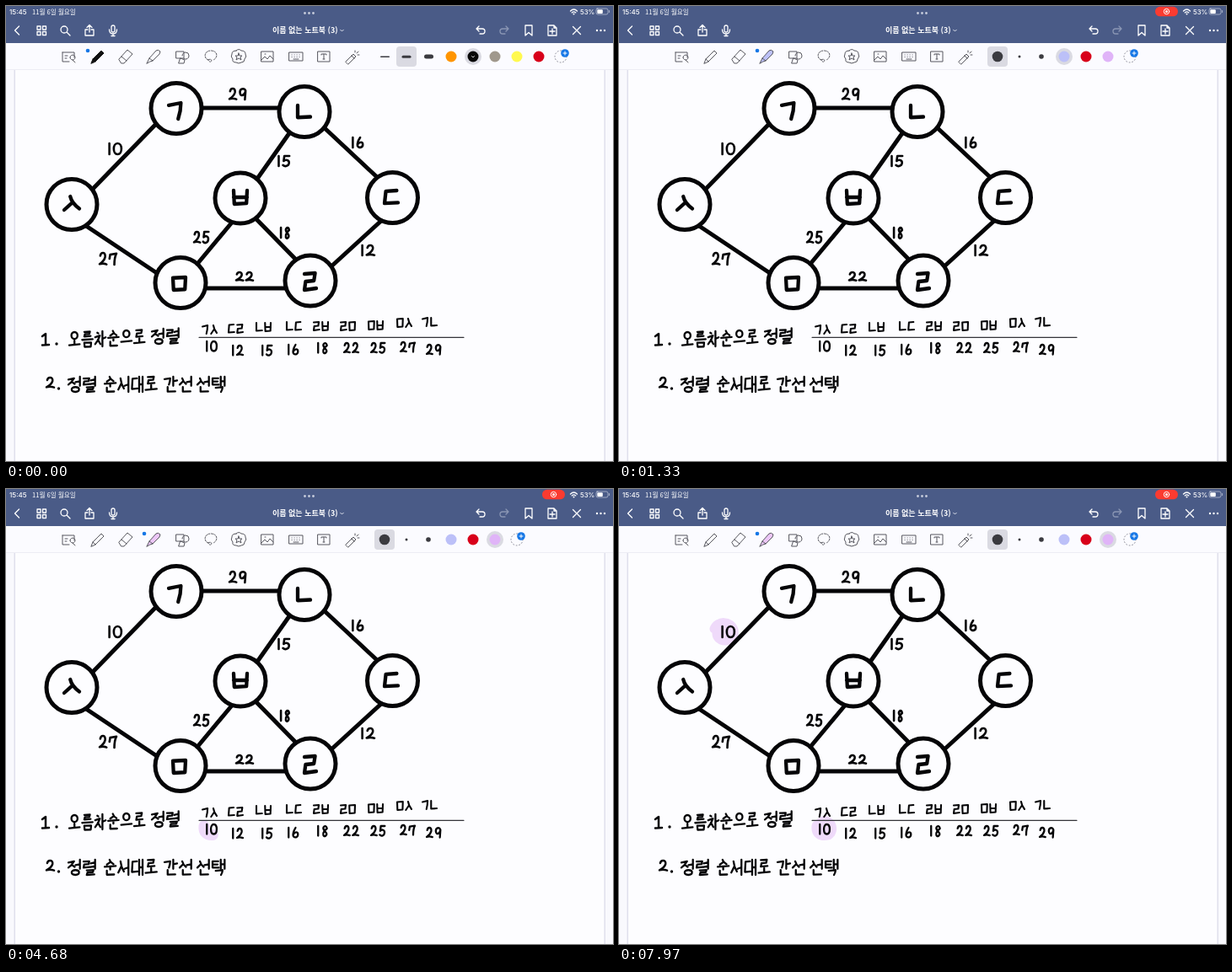
These frames come from a looping animation (720 by 540 pixels, 8 s). An HTML page:

```html
<!DOCTYPE html>
<html lang="ko">
<head>
<meta charset="utf-8">
<title>Minimum spanning tree notes</title>
<style>
  html, body { margin: 0; height: 100%; overflow: hidden; background: #fdfdff; }
  svg { display: block; width: 100vw; height: 100vh; }
  path, line, circle, rect { stroke-linecap: round; stroke-linejoin: round; }
  text { fill: #fff; font-family: Inter, 'Noto Sans CJK KR', 'Noto Sans CJK', sans-serif; }
  .ko { font-family: 'Noto Sans CJK KR', 'Noto Sans CJK', sans-serif; }
</style>
</head>
<body>
<svg id="stage" viewBox="0 0 720 540"></svg>
<script>
const LOOP = 8000;
const INK = '#050507', HEADER = '#4a5b87', SELECTED = '#dadae2', LINE = '#57575e', CHARCOAL = '#3b3b40';
const LAVENDER = '#bcc0f8', PINK = '#e0b4f8', RED = '#d8001a', MARKER = '#efdafa', BLUE = '#1677e6';

const stage = document.getElementById('stage');

function add(tag, attrs, parent = stage) {
  const el = document.createElementNS('http://www.w3.org/2000/svg', tag);
  for (const key in attrs) el.setAttribute(key, attrs[key]);
  return parent.appendChild(el);
}
const group = () => add('g', {});
const rect = (x, y, width, height, fill, rx = 0, parent) =>
  add('rect', { x, y, width, height, fill, rx }, parent);
const dot = (cx, cy, r, fill, parent) => add('circle', { cx, cy, r, fill }, parent);
const label = (x, y, size, content, weight = 500, cls = '') =>
  add('text', { x, y, 'font-size': size, 'font-weight': weight, class: cls }).textContent = content;
const icon = (x, y, d, stroke = LINE, width = 1, fill = 'none', parent) =>
  add('path', { d, transform: `translate(${x} ${y})`, stroke, 'stroke-width': width, fill }, parent);

// Page and bars
rect(0, 0, 720, 540, '#fdfdff');
rect(0, 76, 10, 464, '#f9f9fd');
rect(711, 76, 9, 464, '#f9f9fd');
rect(9.5, 76, 1.5, 464, '#e0e0ec');
rect(709.5, 76, 1.5, 464, '#e0e0ec');
rect(0, 0, 720, 44, HEADER);
rect(0, 44, 720, 31.5, '#fbfbff');
rect(0, 75, 720, 1, '#ececf4');

// Status bar
label(4, 9.6, 8, '15:45');
label(31, 9.6, 7.6, '11월 6일 월요일', 500, 'ko');
for (const x of [354.5, 359.5, 364.5]) dot(x, 8.5, 1.4, '#c5cbdb');
icon(673.5, 7, 'M-4-1Q0-5 4-1M-2.3 .9Q0-1.2 2.3 .9', '#fff', 1.3);
dot(673.5, 9.4, 1, '#fff');
label(681, 9.8, 7.8, '53%');
icon(707, 6.5, 'M-6-3.5H5Q7-3.5 7-1.5V1.5Q7 3.5 5 3.5H-5Q-7 3.5-7 1.5V-1.5Q-7-3.5-5-3.5Z', '#aab3ca', .9);
rect(701.3, 4.3, 6.5, 4.6, '#fff', 1);
icon(715.6, 6.5, 'M0-1V1', '#aab3ca', 1);

// Title bar
label(316, 32.3, 9, '이름 없는 노트북 (3)', 700, 'ko');
icon(398.5, 29, 'M-1.8-.8L0 1L1.8-.8', '#dfe3ee');
[
  [13, 'M2.5-5L-2.5 0L2.5 5'],
  [42, 'M-5-5H-1V-1H-5ZM1.5-5H5.5V-1H1.5ZM-5 1.5H-1V5.5H-5ZM1.5 1.5H5.5V5.5H1.5Z'],
  [70, 'M3-1A4 4 0 1 1-5-1A4 4 0 1 1 3-1M2 2L6 6'],
  [99, 'M-2-1H-5V6H5V-1H2M0 2V-6M-3-3.5L0-6.5L3-3.5'],
  [127, 'M-2-4Q-2-6 0-6T2-4V0Q2 2 0 2T-2 0ZM-4.5-1Q-4.5 4 0 4T4.5-1M0 4V6.5M-2 6.5H2'],
  [563, 'M-2-5L-5-2L-2 1M-5-2H2A3 3 0 0 1 2 4H-1'],
  [591, 'M2-5L5-2L2 1M5-2H-2A3 3 0 0 0-2 4H1', '#8a96b4'],
  [620, 'M-4-6H4V6L0 2.5L-4 6Z'],
  [648, 'M-5-6H2L5-3V6H-5ZM2-6V-3H5M0-2V4M-3 1H3'],
  [677, 'M-4.5-4.5L4.5 4.5M4.5-4.5L-4.5 4.5']
].forEach(([x, d, color = '#fff']) => icon(x, 29, d, color, 1.3));
for (const x of [701, 705.5, 710]) dot(x, 29, 1.2, '#fff');

// Toolbar
const PEN = 'M-7 8L-5 3L5-7L8-4L-2 6ZM-5 3L-2 6';
const HIGHLIGHTER = 'M-8 8L-5 2L3-7Q5-9 8-6L7-3L-1 5L-4 6ZM-5 2L-1 5';
[
  [74, 'M-7-5H7V1M-7-5V6H1M-4-1H-1M2 1A3 3 0 1 1 2 1.1M5 4L8 7M-4 2H-2'],
  [142, 'M-8 3L2-8L8-3L-2 8H-5ZM-5 0L1 5'],
  [209, 'M-7-6H2V2H-7ZM0-1A4 4 0 0 1 8-1A4 4 0 0 1 2 2.6M-2 2L3 4L2 8H-4Z'],
  [243, 'M-3 4C-9 2-8-7 0-7S9 1 3 4M-3 4Q0 2 1 5Q-1 8-3 4', '2 1.4'],
  [276, 'M-3-7Q0-10 3-7Q8-7 8-3Q10 0 7 3Q7 7 3 7Q0 9-3 7Q-8 7-7 3Q-10 0-8-3Q-8-7-3-7ZM0-4L1-1H4L2 1L3 4L0 2L-3 4L-2 1L-4-1H-1Z'],
  [310, 'M-7-6H7V6H-7ZM-7 4L-3 0L0 3L3-1L7 3M-3-3H-2'],
  [344, 'M-8-5H8V5H-8ZM-5-2H-4.8M-2-2H-1.8M1-2H1.2M4-2H4.2M-5 .5H-4.8M-2 .5H-1.8M1 .5H1.2M4 .5H4.2M-3 3H3'],
  [377, 'M-7-6H7V6H-7ZM-3-2V-3H3V-2M0-3V3M-1 3H1'],
  [411, 'M-8 6L1-3L4 0L-5 9ZM-1-1L2 2M3-5V-7M6-2H8M5-4L7-6']
].forEach(([x, d, dash = 'none']) => icon(x, 60, d).setAttribute('stroke-dasharray', dash));

function addColorButton(x, parent) {
  add('circle', { cx: x, cy: 60, r: 7, fill: 'none', stroke: '#8a8a96', 'stroke-dasharray': '1 2.6' }, parent);
  dot(x + 5, 56, 4.8, BLUE, parent);
  icon(x + 5, 56, 'M-2 0H2M0-2V2', '#fff', 1, 'none', parent);
}
function swatches(colors, selected, parent) {
  colors.forEach((color, i) => {
    const x = 528 + 26 * i;
    if (i === selected) dot(x, 60, 10, SELECTED, parent);
    dot(x, 60, 6.5, color, parent);
  });
  addColorButton(528 + 26 * colors.length, parent);
}

const penBar = group();
icon(108, 60, PEN, '#111', 1, '#111', penBar);
icon(175, 60, HIGHLIGHTER, LINE, 1, 'none', penBar);
dot(97, 53, 2.3, BLUE, penBar);
rect(463, 48, 24, 24, SELECTED, 4, penBar);
rect(444, 59.4, 11, 1.5, CHARCOAL, .7, penBar);
rect(469.5, 58.7, 11, 3, CHARCOAL, 1.5, penBar);
rect(496, 57.5, 11, 5, CHARCOAL, 2.5, penBar);
swatches(['#ff9500', '#080808', '#a0988c', '#fff94f', RED], 1, penBar);
icon(554, 60, 'M-1.5-.5L0 1L1.5-.5', '#fff', .8, 'none', penBar);

function highlighterBar(selected, tint) {
  const bar = group();
  icon(108, 60, PEN, LINE, 1, 'none', bar);
  icon(175, 60, HIGHLIGHTER, LINE, 1, tint, bar);
  dot(164, 53, 2.3, BLUE, bar);
  rect(437, 48, 24, 24, SELECTED, 4, bar);
  dot(449, 60, 6.3, CHARCOAL, bar);
  dot(475, 60, 1.5, CHARCOAL, bar);
  dot(501, 60, 2.8, CHARCOAL, bar);
  swatches([LAVENDER, RED, PINK], selected, bar);
  return bar;
}
const lavenderBar = highlighterBar(0, LAVENDER);
const pinkBar = highlighterBar(2, '#ecc6f8');

const recording = group();
rect(636, .8, 27, 11.5, '#fb3b30', 5.7, recording);
add('circle', { cx: 649.5, cy: 6.5, r: 3.2, fill: 'none', stroke: '#fff', 'stroke-width': 1 }, recording);
dot(649.5, 6.5, 1.5, '#fff', recording);

// Marker strokes lie below the ink
const marker = (d, width, start, end) => ({
  start, end,
  el: add('path', { d, pathLength: 1, fill: 'none', stroke: MARKER, 'stroke-width': width, 'stroke-dasharray': '1 2' })
});
const markers = [
  marker('M235 400C234 408 239 412 248 410C255 405 251 393 242 395C234 398 236 408 243 406L246 401', 13, 4400, 5450),
  marker('M113 166C117 156 132 156 136 167C138 177 129 182 121 179C113 175 115 165 124 164L129 171L122 172', 11, 6140, 7350)
];

// Handwriting: every glyph is drawn in a 10 by 10 box
const GLYPHS = {
  0: 'M5 0C-1.5 0-1.5 10 5 10S11.5 0 5 0',
  1: 'M5 0V10',
  2: 'M1 2.5C2-1 9-1 8 3.5C7 6 4 8 0 9.5Q5 8.5 10 9.7',
  5: 'M9 0H2L1 5C4 3 9 4 8.5 7S3 11 0 9',
  6: 'M5 0C2 3 0 6 1 8.5C3 11 9 10 9 7S4 4 1 7',
  7: 'M0 5L1 1.5L10 .5Q7 4 7 10',
  8: 'M8 2C6-2 0 1 3 4S10 8 6 10S0 8 4 5S9 3 8 2',
  9: 'M9 2C7-1 0 0 1 4S8 6 9 2L8 10',
  ㄱ: 'M0 1.5L9 0Q9 5 7 10', ㄴ: 'M0 0V9.5L10 9', ㄷ: 'M9 0L1 .5L0 9.5L10 9',
  ㄹ: 'M0 .5L9 0L8 4.5L1 5L0 10L10 9', ㅁ: 'M0 .5L10 0L9.5 9.5L.5 10Z', ㅂ: 'M0 0L.5 10L9.5 9.5L10 0M0 5H10',
  ㅅ: 'M4 0Q5 5 10 9M5.5 4.5L0 10', ㅇ: 'M5 0C-1.5 0-1.5 10 5 10S11.5 0 5 0',
  ㅈ: 'M0 2L9 0Q6 6 0 10M5 5L10 9', ㅊ: 'M4 0L6 .5M0 4L9 2.5Q6 7 0 10M5 6L10 10', ㅌ: 'M9 0H0V10H10M0 5H8',
  ㅏ: 'M3 0V10M3 5L10 4', ㅐ: 'M2 0V10M9 0V10M2 5H9', ㅓ: 'M8 0V10M0 6L8 5', ㅕ: 'M8 0V10M0 4L8 3M0 8L8 7',
  ㅗ: 'M5 0V8M0 9L10 7', ㅜ: 'M0 3L10 1M5 2V10', ㅡ: 'M0 6L10 4'
};
const glyph = (char, x, y, w, h, width) => add('path', {
  d: GLYPHS[char], transform: `translate(${x} ${y}) scale(${w / 10} ${h / 10})`,
  fill: 'none', stroke: INK, 'stroke-width': width, 'vector-effect': 'non-scaling-stroke'
});

// Spreads characters over a width; the digit one is narrow
function write(word, x, y, w, h, width = 2.6) {
  const shares = [...word].map(c => c === '1' ? .35 : 1);
  const gap = 3.5;
  const unit = (w - gap * (word.length - 1)) / shares.reduce((a, b) => a + b);
  [...word].forEach((c, i) => {
    glyph(c, x, y, unit * shares[i], h, width);
    x += unit * shares[i] + gap;
  });
}

function syllable(jamo, x, y, w, h) {
  const [first, vowel, last] = jamo;
  const put = (c, l, t, r, b) => glyph(c, x + l * w, y + t * h, (r - l) * w, (b - t) * h, 2.3);
  if ('ㅗㅜㅡ'.includes(vowel)) {
    put(first, .2, 0, .8, last ? .32 : .45);
    put(vowel, 0, last ? .38 : .55, 1, last ? .65 : .9);
    if (last) put(last, .2, .72, .85, 1);
  } else {
    put(first, 0, .1, .5, last ? .52 : .85);
    put(vowel, .56, 0, 1, last ? .6 : 1);
    if (last) put(last, .25, .68, .85, 1);
  }
}
function sentence(words, slope) {
  for (const [jamo, x, y, pitch] of words)
    jamo.split(' ').forEach((s, i) => syllable(s, x + i * pitch, y + i * slope, pitch - 3, 18));
}

// Graph
const NODES = [
  ['ㄱ', 202, 121.5, 193, 115, 16, 19], ['ㄴ', 354, 125.5, 346, 118, 15, 15],
  ['ㅅ', 78, 235.5, 69, 226, 18, 16], ['ㅂ', 278, 228, 270, 219, 16, 16],
  ['ㄷ', 458.5, 227.5, 449, 219, 16, 16], ['ㅁ', 207, 328.5, 198, 322, 15, 15],
  ['ㄹ', 361, 326, 354, 317, 14, 20]
];
const EDGES = 'M103 217L178 140M233 121H324M336 151L298 205M378 145L440 203M95 261L179 317' +
  'M227 306L267 258M297 253L344 301M445 255L387 308M237 335H331';
icon(0, 0, EDGES, INK, 5);
for (const [char, cx, cy, ...box] of NODES) {
  add('circle', { cx, cy, r: 30, fill: 'none', stroke: INK, 'stroke-width': 5 });
  glyph(char, ...box, 4.3);
}
[
  ['29', 265, 98, 20, 13], ['10', 121, 163, 16, 13], ['15', 322, 178, 15, 12],
  ['16', 410, 156, 14, 12], ['25', 223, 268, 18, 13], ['18', 325, 263, 12, 12],
  ['27', 111, 293, 20, 14], ['12', 421, 284, 16, 12], ['22', 273, 316, 20, 10]
].forEach(args => write(...args));

// Sorted table
add('line', { x1: 229, y1: 393.3, x2: 543, y2: 393.3, stroke: '#333338', 'stroke-width': 1.2 });
[
  ['ㄱㅅ', 233, 379, '10', 237, 398], ['ㄷㄹ', 264, 378, '12', 268, 403], ['ㄴㅂ', 297, 376, '15', 303, 403],
  ['ㄴㄷ', 333, 375, '16', 334, 402], ['ㄹㅂ', 365, 375, '18', 369, 400], ['ㄹㅁ', 397, 375, '22', 401, 400],
  ['ㅁㅂ', 430, 374, '25', 433, 400], ['ㅁㅅ', 464, 371, '27', 468, 399], ['ㄱㄴ', 494, 370, '29', 499, 402]
].forEach(([pair, px, py, weight, x, y]) => {
  write(pair, px, py, 17, 10, 2.1);
  write(weight, x, y, weight[0] === '1' ? 13 : 17, 11.5, 2.3);
});

// Steps
icon(43, 389, 'M0 3L4 0V13M0 13.5L8 13', INK, 2.5);
dot(60, 401, 1.7, INK);
sentence([
  ['ㅇㅗ ㄹㅡㅁ ㅊㅏ ㅅㅜㄴ ㅇㅡ ㄹㅗ', 75, 387, 15.4],
  ['ㅈㅓㅇ ㄹㅕㄹ', 173, 383, 18]
], -.5);
glyph('2', 48, 441, 9, 12, 2.5);
dot(62.5, 454, 1.7, INK);
sentence([
  ['ㅈㅓㅇ ㄹㅕㄹ', 74, 440, 18], ['ㅅㅜㄴ ㅅㅓ ㄷㅐ ㄹㅗ', 117, 440, 16.2],
  ['ㄱㅏㄴ ㅅㅓㄴ', 188, 440, 18], ['ㅅㅓㄴ ㅌㅐㄱ', 227, 440, 18]
], 0);

const show = (el, visible) => el.setAttribute('visibility', visible ? 'visible' : 'hidden');

function draw(now) {
  const t = now % LOOP;
  show(penBar, t < 850);
  show(recording, t >= 850);
  show(lavenderBar, t >= 850 && t < 3400);
  show(pinkBar, t >= 3400);
  for (const { el, start, end } of markers) {
    const progress = Math.min(1, Math.max(0, (t - start) / (end - start)));
    show(el, t >= start);
    el.setAttribute('stroke-dashoffset', 1 - progress);
  }
}

const begin = performance.now();
(function frame() {
  draw(performance.now() - begin);
  requestAnimationFrame(frame);
})();
</script>
</body>
</html>
```
